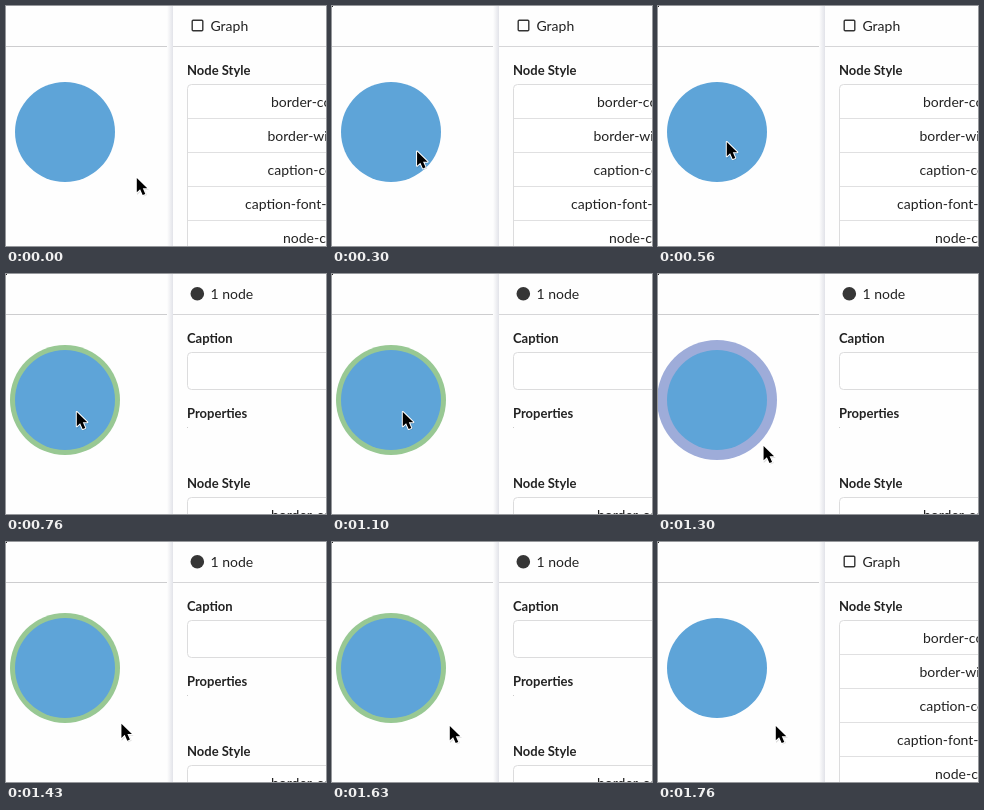
An HTML page that plays this animation: 320 by 240 pixels, repeating every 1960 ms.

```html
<!DOCTYPE html>
<html lang="en">
<head>
<meta charset="utf-8">
<title>Node selection</title>
<style>
html, body { margin: 0; width: 100%; height: 100%; overflow: hidden; background: #fefefe; }
svg { display: block; width: 100vw; height: 100vh; }
text { font: 14px Lato, sans-serif; fill: #222; }
.bold { font-size: 13px; font-weight: 700; }
.box { fill: #fff; stroke: #dcdcdd; }
.rule { stroke: #e0e0e1; }
</style>
</head>
<body>
<svg viewBox="0 0 320 240">
  <defs>
    <linearGradient id="shade">
      <stop offset="0" stop-color="#fefefe"/>
      <stop offset="1" stop-color="#e2e3e9"/>
    </linearGradient>
    <g id="styles">
      <text class="bold" x="181" y="69">Node Style</text>
      <rect class="box" x="181.5" y="78.5" width="200" height="240" rx="4"/>
      <path class="rule" d="M182 112.5H320M182 146.5H320M182 180.5H320M182 214.5H320"/>
      <text x="265" y="101">border-color</text>
      <text x="261.5" y="135">border-width</text>
      <text x="261.5" y="169">caption-color</text>
      <text x="239" y="203">caption-font-size</text>
      <text x="277" y="237">node-color</text>
    </g>
  </defs>
  <rect width="320" height="240" fill="#fefefe"/>
  <path d="M0 40.5H167" stroke="#cdcdcf"/>
  <circle id="ring" cx="59" cy="126"/>
  <circle cx="59" cy="126" r="50" fill="#5ea4d8"/>
  <rect x="161" width="6" height="240" fill="url(#shade)"/>
  <rect x="167" width="153" height="240" fill="#fefefe"/>
  <path d="M167 40.5H320" stroke="#d6d6d8"/>
  <g id="graph">
    <rect x="186.2" y="14.2" width="10.6" height="10.6" rx="1" fill="none" stroke="#333" stroke-width="1.4"/>
    <text x="204.5" y="25">Graph</text>
    <use href="#styles"/>
  </g>
  <g id="node">
    <circle cx="191.3" cy="19.7" r="6.8" fill="#363636"/>
    <text x="204.5" y="25">1 node</text>
    <text class="bold" x="181" y="69">Caption</text>
    <rect class="box" x="181.5" y="78.5" width="200" height="37" rx="4"/>
    <text class="bold" x="181" y="144">Properties</text>
    <rect x="181" y="153" width="1" height="1" fill="#ccc"/>
    <use href="#styles" y="145"/>
  </g>
  <rect id="corner" width="1" height="1" fill="#222"/>
  <g id="cursor">
    <path d="M1 2V18L5 14.5L7.5 19.5L11 18L9 13H13Z" fill="#000" opacity=".13"/>
    <path d="M.8 1V15.3L4.1 12.2L6.7 18L9.3 16.9L6.8 11.3H11.3Z" fill="#000" stroke="#fff" stroke-width="2" stroke-linejoin="round" paint-order="stroke"/>
  </g>
</svg>
<script>
const LOOP = 1960;
const TICKS = [0, 30, 100, 160, 230, 300, 360, 430, 500, 560, 760,
  1100, 1160, 1230, 1300, 1360, 1430, 1500, 1560, 1630, 1700, 1760];
const $ = id => document.getElementById(id);
const show = (id, on) => $(id).setAttribute("visibility", on ? "visible" : "hidden");

function glide(t, start, length, from, to, power) {
  const u = Math.min(1, Math.max(0, (t - start) / length));
  const p = 1 - (1 - u) ** power;
  return from.map((v, i) => v + (to[i] - v) * p);
}

function pointer(t) {
  if (t < 760) return glide(t, 0, 540, [130, 171], [68, 135], 1.65);
  return glide(t, 1100, 460, [70, 137], [117, 183], 2.36);
}

function draw(now) {
  const time = now % LOOP;
  const t = TICKS.filter(tick => tick <= time).pop();
  const [x, y] = pointer(t);
  const selected = t >= 760 && t < 1700;
  const distance = Math.hypot(x - 59, y - 126);
  const onEdge = distance > 50 && distance < 66;

  $("cursor").setAttribute("transform", `translate(${x} ${y})`);
  $("ring").setAttribute("r", onEdge ? 60 : 55);
  $("ring").setAttribute("fill", onEdge ? "#9eacd9" : "#98c893");
  show("ring", selected);
  show("node", selected);
  show("graph", !selected);
  show("corner", t >= 30);
}

const start = performance.now();
function frame() {
  draw(performance.now() - start);
  requestAnimationFrame(frame);
}
frame();
</script>
</body>
</html>
```
